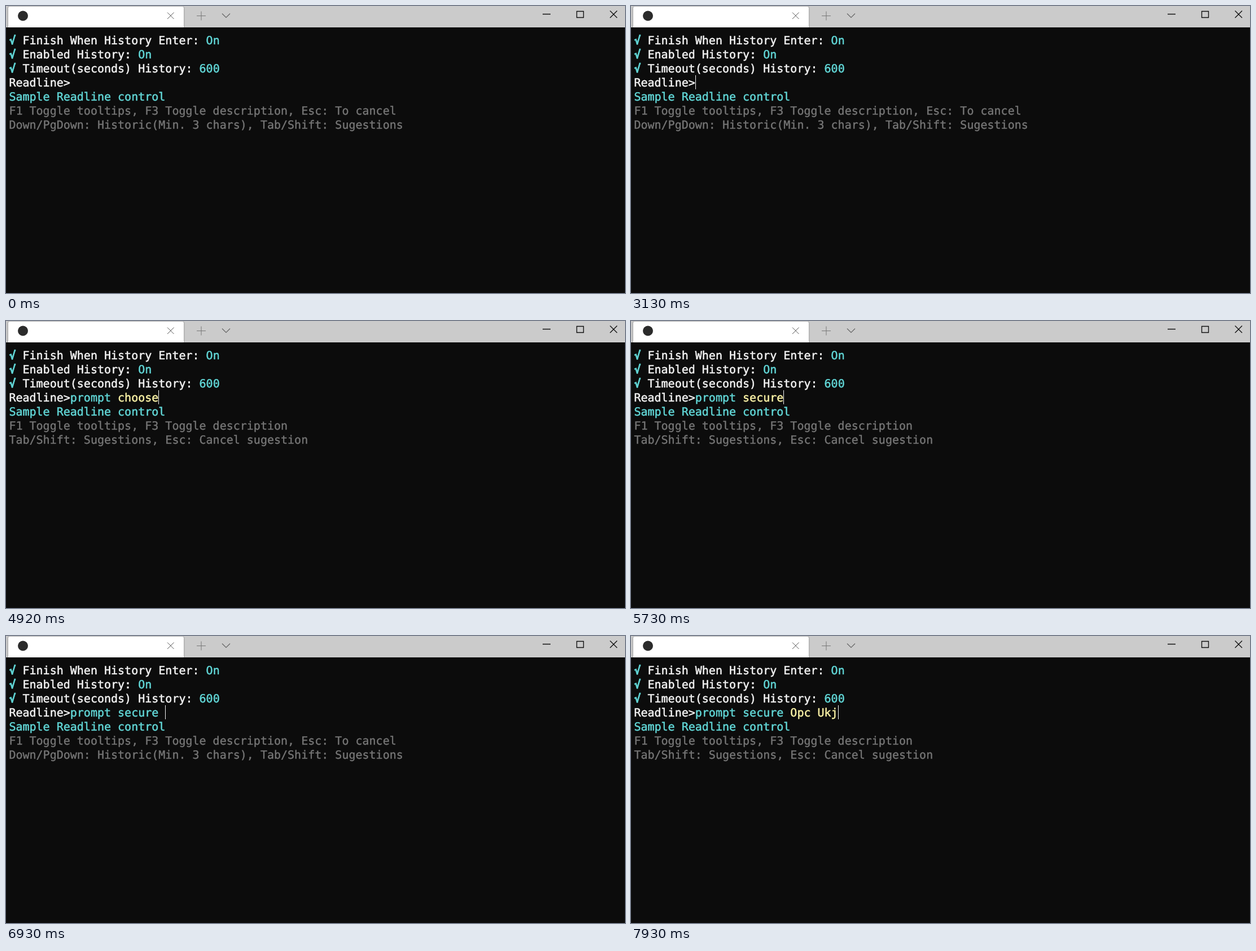
An HTML page that plays this animation: 1097x510 px, repeating every 8000 ms.

```html
<!DOCTYPE html>
<html lang="en">
<head>
<meta charset="utf-8">
<title>Readline prompt</title>
<style>
  html, body { margin: 0; width: 100%; height: 100%; overflow: hidden; background: #0c0c0c; }
  svg { display: block; }
  text { font: 20px "DejaVu Sans Mono", monospace; white-space: pre; text-rendering: geometricPrecision; color: #f2f2f2; }
  text, tspan { fill: currentColor; stroke: currentColor; stroke-width: .55px; }
  .cyan { color: #61d6d6; }
  .tick { color: #61d6d6; font-weight: bold; }
  .yellow { color: #f9f1a5; }
  .gray { color: #767676; stroke-width: .4px; }
  .tab { filter: drop-shadow(0 0 1.5px #0006); }
  .icons path { fill: none; }
</style>
</head>
<body>
<svg width="1097" height="510" viewBox="0 0 1097 510">
  <rect width="1097" height="38" fill="#cbcbcb"/>
  <path class="tab" d="M4 38V4q0-3 3-3H312q3 0 3 3V38z" fill="#fff"/>
  <rect y="38" width="1097" height="472" fill="#0c0c0c"/>
  <circle cx="30" cy="17.5" r="9" fill="#2b2b2b"/>
  <g class="icons">
    <path d="M286 11.5l11.5 11.5m0-11.5L286 23" stroke="#555"/>
    <path d="M338 17.5h16m-8-8v16" stroke="#777"/>
    <path d="M383 13.5l7 7 7-7" stroke="#666" stroke-width="1.2"/>
    <path d="M951 14.5h14M1011.5 9.5h12v11h-12zM1070.5 8.5l12.5 12.5m0-12.5L1070.5 21" stroke="#111" stroke-width="1.4"/>
  </g>
  <g id="screen"></g>
  <rect id="pointer" x="210" y="123" width="12" height="25" fill="#8a8a8a"/>
  <rect id="cursor" y="123" width="1" height="25" fill="#f2f2f2"/>
</svg>
<script>
const LOOP = 8000, LEFT = 5.4, CELL = 12.04, PROMPT = 'Readline>';
const [screen, pointer, cursor] = ['screen', 'pointer', 'cursor'].map(id => document.getElementById(id));

const span = (cls, text) => `<tspan class="${cls}">${text}</tspan>`;
const setting = (label, value) => span('tick', '√') + ` ${label}: ` + span('cyan', value);
const settings = [
  setting('Finish When History Enter', 'On'),
  setting('Enabled History', 'On'),
  setting('Timeout(seconds) History', '600')
];
const tips = {
  none: [],
  input: ['F1 Toggle tooltips, F3 Toggle description, Esc: To cancel',
          'Down/PgDown: Historic(Min. 3 chars), Tab/Shift: Sugestions'],
  suggest: ['F1 Toggle tooltips, F3 Toggle description',
            'Tab/Shift: Sugestions, Esc: Cancel sugestion']
};

// start time, typed text, suggestion, tooltips, cursor on, pointer on
const states = [
  [0, '', '', 'input', 0, 0],
  [1130, '', '', 'input', 1, 1],
  [1600, '', '', 'input', 0, 1],
  [1800, '', '', 'input', 1, 1],
  [2530, '', '', 'input', 0, 1],
  [2600, '', '', 'input', 0, 0],
  [3130, '', '', 'input', 1, 0],
  [4060, 'prompt', '', 'input', 1, 0],
  [4720, 'prompt', '', 'input', 0, 0],
  [4920, 'prompt ', 'choose', 'suggest', 1, 0],
  [5730, 'prompt ', 'secure', 'suggest', 1, 0],
  [6590, 'prompt ', 'secure', 'suggest', 0, 0],
  [6860, 'prompt ', 'secure', 'suggest', 1, 0],
  [6930, 'prompt secure ', '', 'input', 1, 0],
  [7330, 'prompt secure ', '', 'none', 0, 0],
  [7400, 'prompt secure ', 'Opc Ura', 'suggest', 1, 0],
  [7930, 'prompt secure ', 'Opc Ukj', 'suggest', 1, 0]
];

function show([, typed, suggestion, tip, cursorOn, pointerOn]) {
  const rows = [...settings, PROMPT + span('cyan', typed) + span('yellow', suggestion)];
  if (tip !== 'none') rows.push(span('cyan', 'Sample Readline control'));
  rows.push(...tips[tip].map(line => span('gray', line)));
  screen.innerHTML = rows.map((row, i) => `<text x="${LEFT}" y="${68 + 25 * i}">${row}</text>`).join('');
  const column = (PROMPT + typed + suggestion).length;
  cursor.setAttribute('x', Math.round(LEFT + column * CELL));
  cursor.setAttribute('opacity', cursorOn);
  pointer.setAttribute('opacity', pointerOn);
}

let current;
function tick() {
  const time = performance.now() % LOOP;
  const state = states.findLast(([start]) => start <= time);
  if (state !== current) show(current = state);
  requestAnimationFrame(tick);
}
tick();
</script>
</body>
</html>
```
